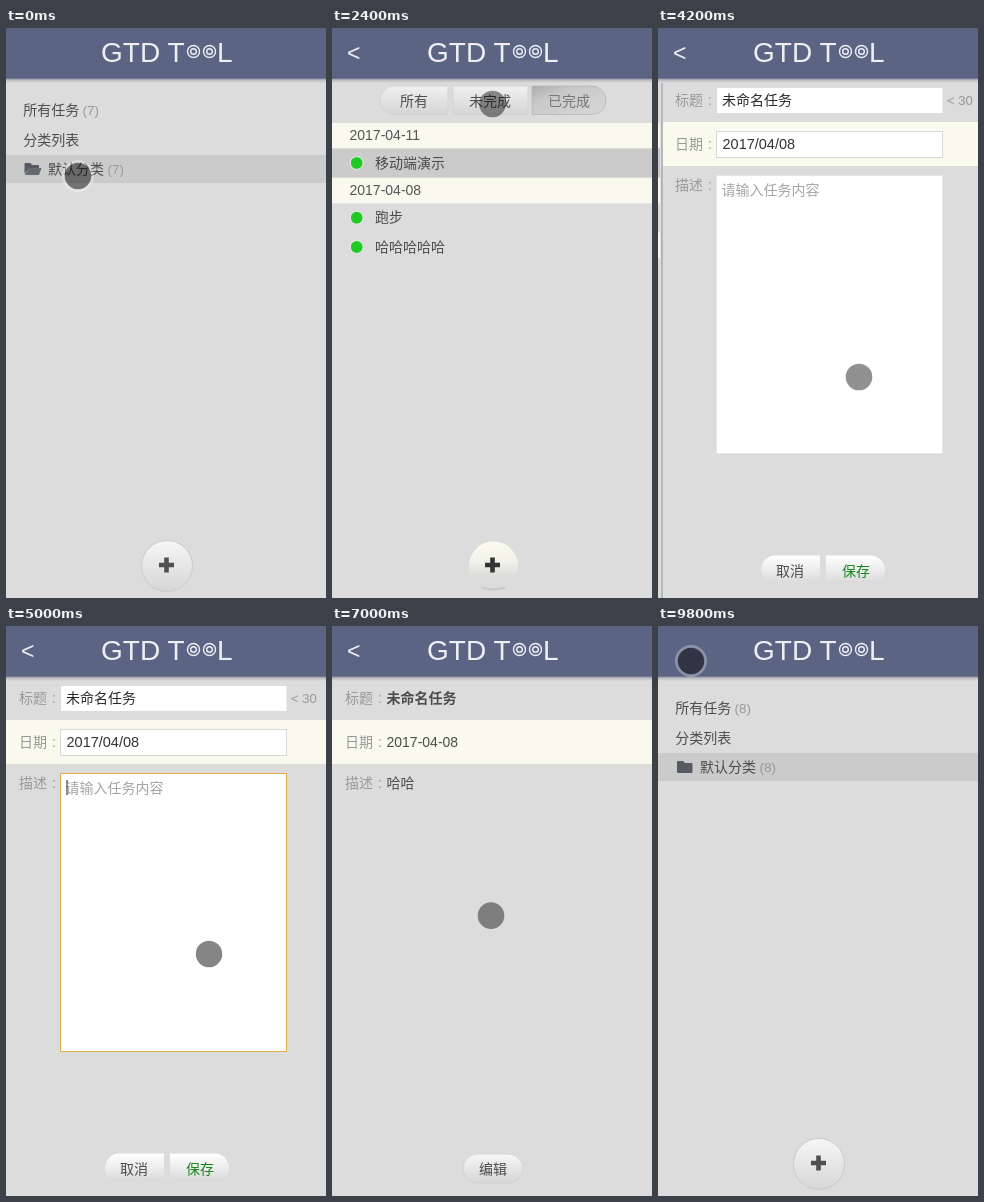
An HTML page for the animation above (10000 ms loop, 320 by 570 pixels).

```html
<!DOCTYPE html>
<html lang="zh-CN">
<head>
<meta charset="utf-8">
<title>GTD</title>
<style>
html, body { margin: 0; width: 100%; height: 100%; overflow: hidden; background: #dcdcdc; }
svg { display: block; width: 100vw; height: 100vh; }
text { font-family: "Liberation Sans", "Noto Sans CJK SC", "Noto Sans CJK", sans-serif; white-space: pre; }
</style>
</head>
<body>
<svg viewBox="0 0 320 570">
  <defs>
    <linearGradient id="button" x2="0" y2="1"><stop stop-color="#f0f0f0"/><stop offset="1" stop-color="#d5d5d5"/></linearGradient>
    <linearGradient id="pressed" x2="1" y2="1"><stop stop-color="#aaa"/><stop offset=".3" stop-color="#c8c8c8"/><stop offset="1" stop-color="#d8d8d8"/></linearGradient>
    <linearGradient id="bright" x2="0" y2="1"><stop stop-color="#fff"/><stop offset=".45" stop-color="#eee"/><stop offset=".9" stop-color="#dcdcdc"/></linearGradient>
    <linearGradient id="round" x2="0" y2="1"><stop stop-color="#f7f7f7"/><stop offset=".5" stop-color="#e6e6e6"/><stop offset="1" stop-color="#d6d6d6"/></linearGradient>
    <linearGradient id="cap" x2="0" y2="1"><stop stop-color="#fbfbf0"/><stop offset=".4" stop-color="#f2f2e9"/><stop offset=".7" stop-color="#dcdcdc"/></linearGradient>
    <linearGradient id="shade" x2="0" y2="1"><stop stop-color="#777b91"/><stop offset=".4" stop-color="#b9bac0"/><stop offset="1" stop-color="#dcdcdc"/></linearGradient>
  </defs>
  <g id="scene"></g>
</svg>
<script>
const LOOP = 10000, STEP = 200, PITCH = 322, SLIDE = 500;
const CREAM = '#f9f9ee', SELECTED = '#cbcbcb', DARK = '#4c4c4c', MUTED = '#999', TITLE = '#eeeff5';
const scene = document.getElementById('scene');

// start time, page left, page entered (0 folders, 1 tasks, 2 task)
const slides = [[100, 0, 1], [3771, 1, 2], [8501, 2, 1], [9100, 1, 0]];

// time, x, y
const pointerPath = [
  [0, 72, 148], [800, 72, 148], [1200, 138, 95], [1400, 147, 84], [1600, 147, 84],
  [2000, 237, 76], [2200, 237, 76], [2600, 84, 76], [2800, 84, 76], [3200, 150, 470],
  [3400, 168, 537], [3800, 168, 537], [4200, 201, 349], [4600, 203, 328], [5500, 203, 328],
  [5800, 206, 393], [6000, 200, 505], [6200, 195, 541], [6600, 195, 541],
  [7200, 141, 164], [7800, 33, 35], [10000, 33, 35]
];
const presses = [[0, 400], [1400, 1600], [2000, 2200], [2600, 2800], [3600, 3800], [4800, 5000], [6400, 6600], [8200, 10000]];

const groups = [
  ['2017-04-18', [['制作冰淇淋', 0]]],
  ['2017-04-11', [['移动端演示', 1]]],
  ['2017-04-08', [['跑步', 1], ['测试', 0], ['哈哈哈哈哈', 1], ['未命名任务', 0], ['未命名任务', 0]]]
];

const text = (s, x, cy, fill = DARK, size = 14, extra = '') =>
  `<text x="${x}" y="${cy + 5}" fill="${fill}" font-size="${size}" ${extra}>${s}</text>`;
const centered = (s, x, cy, fill) => text(s, x, cy, fill, 14, 'text-anchor="middle"');
const rect = (x, y, w, h, fill, extra = '') =>
  `<rect x="${x}" y="${y}" width="${w}" height="${h}" fill="${fill}" ${extra}/>`;
const circle = (x, y, r, fill, extra = '') =>
  `<circle cx="${x}" cy="${y}" r="${r}" fill="${fill}" ${extra}/>`;

// Button with a rounded left and/or right end
function pill(x, y, w, h, left, right, fill, stroke = 'none') {
  const r = h / 2, a = left ? r : 0, b = right ? r : 0;
  return `<path d="M${x + a} ${y}h${w - a - b}a${b} ${r} 0 0 1 0 ${h}h${a + b - w}a${a} ${r} 0 0 1 0 ${-h}z"
    fill="${fill}" stroke="${stroke}" stroke-width=".8"/>`;
}

function ease(p) {
  if (p >= 1) return 1;
  const bez = (u, a, b) => 3 * u * (1 - u) ** 2 * a + 3 * u * u * (1 - u) * b + u ** 3;
  let lo = 0, hi = 1;
  for (let i = 0; i < 24; i++) {
    const mid = (lo + hi) / 2;
    if (bez(mid, .25, .25) < p) lo = mid; else hi = mid;
  }
  return bez(lo, .1, 1);
}

function scrollAt(t) {
  let pos = 0;
  for (const [start, from, to] of slides)
    if (t >= start) pos = from + (to - from) * ease((t - start) / SLIDE);
  return pos;
}

const plus = color => `<path d="M153 537h15M160.5 529.5v15" stroke="${color}" stroke-width="4.6"/>`;

function folder(open) {
  return open
    ? `<path d="M18.5 146v-10q0-1 1-1h5l1.5 2h6q1 0 1 1v2h-10z" fill="#555a62"/>
       <path d="M19 147l3.5-7h13l-2.5 7z" fill="#666a70"/>`
    : '<path d="M19 146v-10q0-1 1-1h5l2 2h6.5q1 0 1 1v8q0 1-1 1H20q-1 0-1-1z" fill="#565b63"/>';
}

function foldersPage(t) {
  const count = `(${t < 6600 ? 7 : 8})`;
  return text('所有任务', 17.3, 82) + text(count, 76.5, 82, MUTED, 13.5) +
    text('分类列表', 17.3, 112) +
    rect(0, 127, 320, 28, SELECTED) + folder(t < 9800) +
    text('默认分类', 42, 141) + text(count, 101.5, 141, MUTED, 13.5) +
    circle(161, 538, 25.5, 'url(#round)', 'stroke="#cbcbcb"') + plus('#505050');
}

function tabs(active) {
  return [['所有', 48, 68, 82], ['未完成', 121, 75, 158], ['已完成', 200, 74, 237]].map(([label, x, w, cx], i) =>
    pill(x, 58, w, 28.5, i === 0, i === 2, i === active ? 'url(#pressed)' : 'url(#button)', i === active ? '#b5b5b5' : '#d0d0d0') +
    centered(label, cx, 73, i === active ? '#777' : DARK)).join('');
}

function tasksPage(t) {
  const filter = t >= 1600 && t < 2200 ? 1 : t >= 2200 && t < 2800 ? 2 : 0;
  const saved = t >= 6600;
  let y = 95, index = 0, out = tabs(filter);
  groups.forEach(([date, items], g) => {
    const all = saved && g === 2 ? [...items, ['未命名任务', 0]] : items;
    const shown = all.filter(([, done]) => !filter || done === filter - 1);
    if (!shown.length) return;
    out += rect(0, y, 320, 25.5, CREAM) + text(date, 17.5, y + 12, '#555');
    y += 25.5;
    for (const [name, done] of shown) {
      if (index++ === (saved ? 7 : 0)) out += rect(0, y, 320, 29.25, SELECTED);
      out += circle(24.7, y + 14.5, 6.4, done ? '#1fca25' : '#fb2a2c', 'stroke="#eee"') +
        text(name, 43, y + 14.2);
      y += 29.25;
    }
  });
  return out + circle(161.5, 538, 24.5, 'url(#cap)') +
    '<path d="M150 559.5q11.5 4 23 0" fill="none" stroke="#c8c8c8" stroke-width="2"/>' + plus('#333');
}

const labels = () => [['标题', 72], ['日期', 116], ['描述', 157]]
  .map(([s, y]) => text(s, 13, y, MUTED) + text(':', 46, y, MUTED)).join('');

function editForm(t) {
  const focused = t >= 5000, typed = t >= 5400 ? '哈哈' : t >= 5200 ? '哈' : '';
  const caret = 60.5 + 14 * typed.length;
  return rect(55, 60, 225.5, 25, '#fff') + text('未命名任务', 60, 72, '#2a2a2a') +
    text('&lt; 30', 285, 72, MUTED, 13) +
    rect(54.5, 103.5, 226, 26, '#fff', 'stroke="#d8d8d8"') + text('2017/04/08', 60.5, 116, '#333', 14.5) +
    rect(54.5, 147.5, 226, 278, '#fff', `stroke="${focused ? '#e0ad4c' : '#e6e6e6'}"`) +
    (typed ? text(typed, 60, 162, '#2a2a2a') : text('请输入任务内容', 59.5, 162, '#a5a5a5')) +
    (focused ? rect(caret, 154, 1, 15, '#222') : '') +
    pill(99, 527.5, 59, 29, true, false, 'url(#bright)') + centered('取消', 128, 543) +
    pill(164, 527.5, 59, 29, false, true, 'url(#bright)') + centered('保存', 194, 543, '#15851a');
}

const taskDetail = () =>
  text('未命名任务', 54.5, 72, DARK, 14, 'font-weight="700"') +
  text('2017-04-08', 54.5, 116) + text('哈哈', 54.5, 157) +
  pill(131, 528, 60, 29, true, true, 'url(#round)', '#cfcfcf') + centered('编辑', 161, 543);

const taskPage = t => rect(0, 94, 320, 44, CREAM) + labels() + (t < 6600 ? editForm(t) : taskDetail());

function header(showBack) {
  const ring = x => [6, 2.8].map(r => circle(x, 23.5, r, 'none', `stroke="${TITLE}" stroke-width="1.4"`)).join('');
  return rect(0, 50, 320, 5, 'url(#shade)') + rect(0, 0, 320, 50.5, '#5c6484') +
    text('GTD T', 95, 29, TITLE, 28) + ring(187.5) + ring(203.5) + text('L', 211, 29, TITLE, 28) +
    (showBack ? text('&lt;', 15, 28, TITLE, 23) : '');
}

function pointer(t) {
  const i = Math.max(1, pointerPath.findIndex(p => p[0] >= t));
  const [t0, x0, y0] = pointerPath[i - 1], [t1, x1, y1] = pointerPath[i];
  const k = (t - t0) / (t1 - t0), x = x0 + (x1 - x0) * k, y = y0 + (y1 - y0) * k;
  return presses.some(([a, b]) => t >= a && t <= b)
    ? circle(x, y, 13.3, '#000', 'fill-opacity=".48"') +
      circle(x, y, 14.6, 'none', 'stroke="#fff" stroke-opacity=".3" stroke-width="2.8"')
    : circle(x, y, 13.3, '#000', 'fill-opacity=".43"');
}

function render(t) {
  const pos = scrollAt(t);
  const pages = [foldersPage, tasksPage, taskPage].map((page, i) => {
    const x = Math.round((i - pos) * PITCH);
    if (Math.abs(x) >= PITCH) return '';
    const edge = x ? rect(-1, 50, 2, 520, '#b8b8b8') : '';
    return `<g transform="translate(${x})">${page(t)}${edge}</g>`;
  });
  scene.innerHTML = rect(0, 0, 320, 570, '#dcdcdc') + pages.join('') + header(pos > 0) + pointer(t);
}

const begin = performance.now();
let last = -1;
function tick() {
  const step = Math.floor((performance.now() - begin) % LOOP / STEP);
  if (step !== last) render((last = step) * STEP);
  requestAnimationFrame(tick);
}
tick();
</script>
</body>
</html>
```
